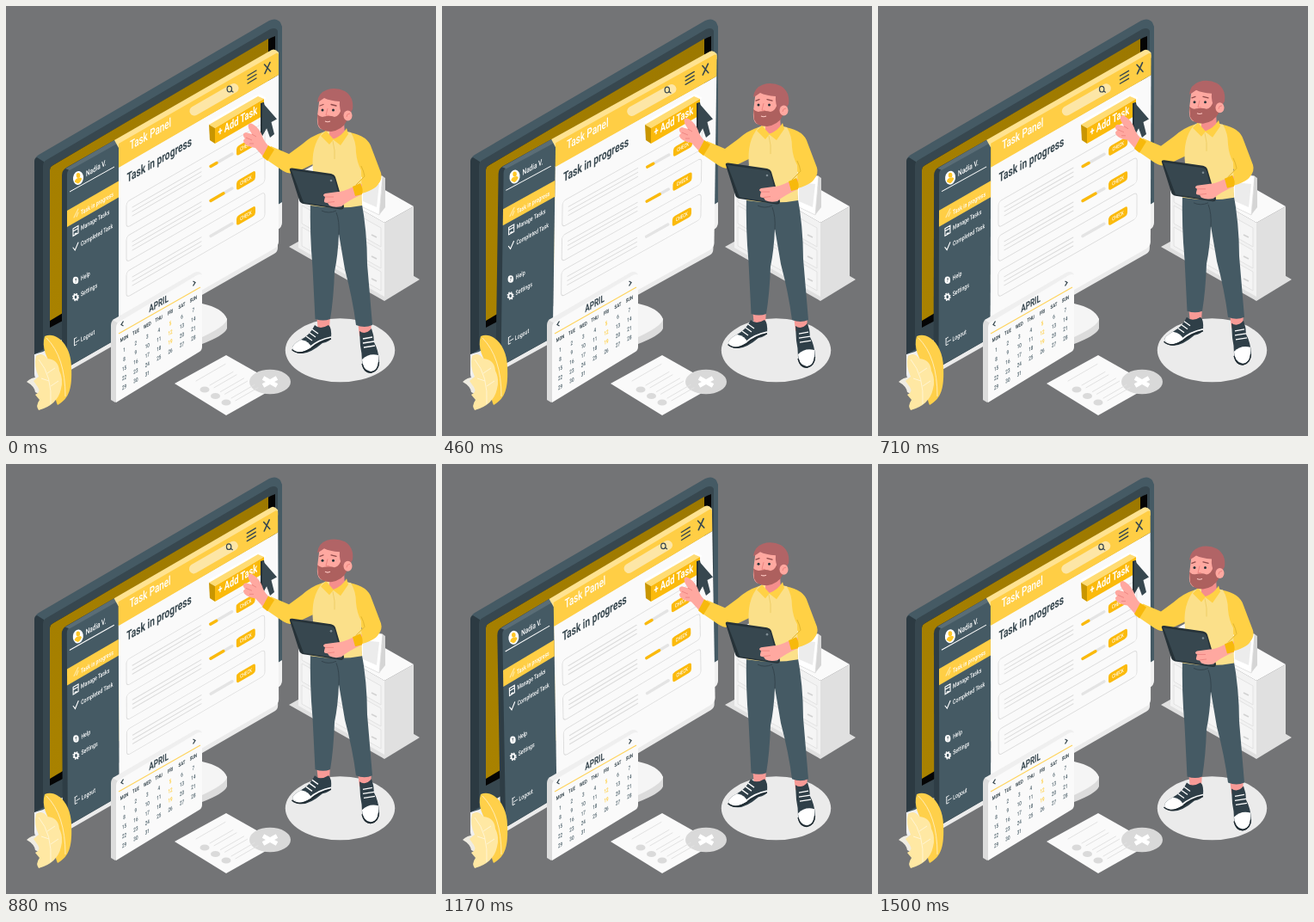
Recreate the animation shown at these times as an HTML page. Size 500x500 px, loop 1540 ms.

```html
<!DOCTYPE html>
<html lang="en">
<head>
<meta charset="utf-8">
<title>Task panel</title>
<style>
html, body { margin: 0; width: 100%; height: 100%; overflow: hidden; background: #737476; }
svg { display: block; width: 100vw; height: 100vh; }
text { font-family: Roboto, Inter, sans-serif; }
</style>
</head>
<body>
<svg viewBox="0 0 500 500" xmlns="http://www.w3.org/2000/svg">
<defs>
  <linearGradient id="gold" x1="0" y1="1" x2="1" y2="0">
    <stop offset="0" stop-color="#a98200"/><stop offset="1" stop-color="#9c7800"/>
  </linearGradient>
</defs>

<g id="monitor">
  <path d="M33 404 L321 226 V252 Q321 257 316 260 L40 436 Q33 434 33 428Z" fill="#f0f0f0"/>
  <path d="M150 385 L215 350 Q247 350 257 364 V375 Q254 383 228 393 L180 410Z" fill="#dcdcdc"/>
  <path d="M150 380 L215 349 L228 346 Q252 351 257 364 Q256 372 228 385 L180 407Z" fill="#f5f5f5"/>
  <path d="M33 405 V182 Q33 176 38 173 L306 17 Q314 13 319 19 L321 24 V228 L43 402Z" fill="#455a64"/>
  <path d="M33 405 V181 Q33 177 36 176 L44 181 V399Z" fill="#2c3a42"/>
  <path d="M43 399 V186 Q43 181 47 179 L307 27 Q314 24 316 29 V231 L80 380Z" fill="#37474f"/>
  <path d="M51 374 V191 Q51 187 55 185 L308 37 L313 35 V230 L66 366Z" fill="#050505"/>
  <path d="M51 366 V191 Q51 187 55 185 L305 38 V230 L66 357Z" fill="url(#gold)"/>
</g>

<g id="panel">
  <path d="M65 418 L316 274 V281 Q316 286 312 288 L65 429Z" fill="#ebebeb"/>
  <path d="M65 424 V197 Q65 191 70 188 L126 156 L131 159 V386Z" fill="#2e3d45"/>
  <path d="M71 420 V196 Q71 191 75 189 L131 157 V386Z" fill="#455a64"/>
  <path d="M69 189 L126 156 L131 159 L74 191Z" fill="#5a6d76"/>
  <path d="M131 187 L317 80 V274 Q317 279 312 282 L131 386Z" fill="#fafafa"/>
  <path d="M126 156 L309 51 Q313 49 317 54 V60 L131 165Z" fill="#ffe391"/>
  <path d="M131 160 L314 55 Q317 54 317 57 V80 L131 188Z" fill="#ffce45"/>
  <path d="M71 238 L131 203.5 V222.5 L71 257Z" fill="#ffce45"/>
  <path d="M74 216 L126 187" stroke="#fff" stroke-width="1"/>
  <ellipse cx="84" cy="200" rx="6" ry="8" fill="#fff" transform="rotate(8 84 200)"/>
  <ellipse cx="84" cy="197" rx="2.3" ry="2.9" fill="#ffc727"/>
  <path d="M79.8 204.5 Q80.5 200.5 84 200 Q87.5 198.5 88.2 201 Q86 206 83.5 206.5Z" fill="#ffc727"/>
  <g fill="none" stroke="#fff" stroke-width="1.1" stroke-linecap="round">
    <path d="M79 246 L84 236 M82 245 L84 240" stroke="#ffe9a6"/>
    <path d="M78 259 L84 255.5 V264 L78 267.5Z M78 262 L84 258.5 M80 265 L82 264"/>
    <path d="M78 281 L80.2 284 L84 275"/>
    <path d="M79.5 387 V395 L82 393.5 M79.500 387 L82 385.5 M81 391 L85 388.5" stroke-width=".9"/>
  </g>
  <ellipse cx="81" cy="319" rx="3.3" ry="4.3" fill="#fff"/>
  <ellipse cx="81" cy="338.5" rx="2.2" ry="2.9" fill="none" stroke="#fff" stroke-width="1.7"/>
  <ellipse cx="81" cy="338.5" rx="3.4" ry="4.2" fill="none" stroke="#fff" stroke-width="1.2" stroke-dasharray="1.5 1.5"/>
  <path d="M219 122 L265 95.5" stroke="#fde6a6" stroke-width="11" stroke-linecap="round"/>
  <g fill="none" stroke="#37474f" stroke-width="1.2" stroke-linecap="round">
    <ellipse cx="259.8" cy="96.5" rx="2.7" ry="3.3"/>
    <path d="M262 98.5 L264 100"/>
    <path d="M281 81 L291 75 M281 85.5 L291 79.5 M281 90 L291 84" stroke-width="1.4"/>
    <path d="M300.5 68 L307.5 76 M307 65.5 L301 78.5" stroke-width="1.6"/>
  </g>
</g>

<g id="button">
  <path d="M235 135 L294 102 L303 107 L243 142Z" fill="#fff"/>
  <path d="M236 138 L293 105 L300 108 L243 142Z" fill="#ffdc73"/>
  <path d="M236 138 L243 142 V160 L237 156Z" fill="#c99600"/>
  <path d="M243 142 L300 108 V127 L243 160Z" fill="#fbba0c"/>
</g>
<g id="cursor">
  <path d="M296 113 L300 112 L304 140 L298 151 L296 147Z" fill="#263238"/>
  <path d="M298 112 L315 131.5 L308.5 135 L312 149 L307 153 L303 142 L298 151Z" fill="#37474f"/>
</g>

<g id="calendar">
  <path d="M122 458 V371 Q122 366 126 364 L132 364 V458 L127 461Z" fill="#dcdcdc"/>
  <path d="M124 365 L219 310 Q225 307 228 312 L132 370Z" fill="#efefef"/>
  <path d="M128 461 V374 Q128 369 132 367 L222 313 Q228 310 228 316 V396 Q228 400 225 402Z" fill="#fafafa"/>
  <path d="M131 381 L226 327" stroke="#ffd45c" stroke-width="1.1"/>
  <g fill="none" stroke="#37474f" stroke-width="1.3">
    <path d="M136.5 366.5 L134 370.5 L136.5 372"/>
    <path d="M217.5 320 L220 321.5 L217.5 325.5"/>
  </g>
</g>

<g id="plant">
  <path d="M24 437 Q30 431 40 432 L56 440 L48 456 L34 449 Q33 442 24 437Z" fill="#efece2"/>
  <path d="M45 384 C60 378 76 396 76 420 C77 444 74 456 60 464 C54 451 60 431 56 421 C47 411 41 396 45 384Z" fill="#ffd04a"/>
  <path d="M47 386 Q69 408 69 454" fill="none" stroke="#fff0c0" stroke-width=".9"/>
  <path d="M35 407 Q42 402 48 410 Q61 411 62 424 Q67 434 64 445 Q60 464 38 470 Q34 465 39 458 L34 452 Q41 449 37 443 L32 436 L38 431 Q32 418 35 407Z" fill="#ffe8a3"/>
  <path d="M38 411 Q54 430 52 463 M48 427 L57 421 M52 442 L61 436 M50 436 L41 433" fill="none" stroke="#fff6d8" stroke-width=".9"/>
</g>

<g id="paper">
  <path d="M196 439 L256 406 L318 441 L256 476Z" fill="#fafafa"/>
  <ellipse cx="307" cy="437" rx="24" ry="14.3" fill="#d9d9d9"/>
  <path d="M299 432.5 L315 441.5 M315 432.5 L299 441.5" stroke="#fff" stroke-width="5"/>
</g>

<g id="cabinet">
  <path d="M329 280 L374 255 L481 318 L440 343Z" fill="#e0e0e0"/>
  <path d="M340 195 L374 176 L474 233 L440 252Z" fill="#fafafa"/>
  <path d="M340 195 L440 252 V338 L340 281Z" fill="#f2f2f2"/>
  <path d="M440 252 L474 233 V319 L440 338Z" fill="#e0e0e0"/>
  <path d="M344 206 L436 258 V280 L344 228Z M344 232 L436 284 V305 L344 253Z M344 257 L436 309 V331 L344 279Z" fill="#f5f5f5" stroke="#e0e0e0" stroke-width=".9"/>
  <path d="M425 266 L431 269 M425 291 L431 294 M425 317 L431 320" stroke="#d2d2d2" stroke-width="1.6"/>
  <path d="M438 198 L441 200 V234 L434 243Z" fill="#d5d5d5"/>
  <path d="M411 192 L438 198 L434 243 L411 232Z" fill="#fff" stroke="#dcdcdc" stroke-width=".8"/>
  <path d="M415 205 L434 207 L431 234 L415 227Z" fill="#ececec"/>
</g>
<ellipse cx="388.5" cy="400.3" rx="63.7" ry="37" fill="#ebebeb"/>

<g id="man">
  <path d="M361 358 H377 L376 377 L363 378Z M409 366 H425 L424 384 L411 384Z" fill="#f79a96"/>
  <path d="M333 398 Q333 393 343 388 Q354 382 359 371 Q365 377 375 371 Q379 374 378 386 Q377 390 368 392 Q354 404 344 404 Q334 404 333 398Z" fill="#2f3f48"/>
  <path d="M333 398 Q333 393 343 388 Q353 390 355 397 Q341 405 333 398Z" fill="#fff"/>
  <path d="M333 399 Q341 405 353 397 Q363 388 378 385" fill="none" stroke="#fff" stroke-width="1.7"/>
  <path d="M332.500 399.500 Q341 407 354 399 Q365 390 378 387" fill="none" stroke="#1f2a30" stroke-width="1.5"/>
  <path d="M349 384 L356 389 M353 380 L360 385 M356 376 L363 381" stroke="#fff" stroke-width="1.3"/>
  <path d="M411 378 Q418 383 425 375 Q428 383 428 391 Q433 400 434 413 Q434 425 424 427 Q414 426 414 414 Q414 404 412 395Z" fill="#2f3f48"/>
  <path d="M414 411 Q422 403 433 406 Q435 424 424 425 Q414 423 414 411Z" fill="#fff"/>
  <path d="M415 387 L426 385 M415 392 L428 390 M416 397 L429 395" stroke="#fff" stroke-width="1.3"/>
  <path d="M414 416 Q417 427 425 426 Q433 424 433.5 414" fill="none" stroke="#1f2a30" stroke-width="1.4"/>

  <path d="M354 225 L413 225 Q420 262 420 300 L426 371 Q417 375 407 371 Q403 340 394 306 L387 265 Q386 290 382 309 Q381 340 377 364 Q369 367 359.500 364 L356.500 304 Q353 265 354 225Z" fill="#455a64"/>
  <path d="M387 266 Q388 250 384 240 M367 238 Q375 242 384 238" fill="none" stroke="#34444d" stroke-width="1"/>

  <path d="M303 176 L308 166 C303 160 299 156 298 151 C296 145 291 139 285 136.5 C281 136 281 140 283 144 L286 149 L279 147 C275 148 275 151 278 154 L276 156 C276 161 283 164 290 165 L299 175Z" fill="#ffa8a0"/>
  <path d="M279 153 L286 156 M283 160 L288 160 M286 149 L291 152" fill="none" stroke="#ec8480" stroke-width=".9"/>
  <path d="M368 147 Q355 151 344 161 L329 172 L308 163 L299 176 L321 191 Q330 197 338 193 L363 181Z" fill="#ffd145"/>
  <path d="M305 162 L312 167 L304 180 L298 175Z" fill="#f7b90c"/>

  <path d="M400 147 Q421 151 425 165 L436 194 Q438 201 433 207 Q429 214 410 219 L405 210 L414 200 L400 175Z" fill="#ffd145"/>
  <path d="M368 147 L379 142 L401 147 Q407 157 407 170 Q408 182 413 191 L414 232 Q388 237 354 232 L357 192 Q354 163 368 147Z" fill="#fbe08a"/>
  <path d="M413 186 Q416 192 417 198 L407 208" fill="none" stroke="#e2b62f" stroke-width="1"/>
  <path d="M376 134 L393 134 L394 149 Q385 157 376 154Z" fill="#f58e8c"/>
  <path d="M372 145 L381 155 L376 161 L366 151Z M396 142 L398 149 L389 162 L380 155 Q391 151 396 142Z" fill="#ffd145"/>
  <path d="M380 157 Q383 168 382 178" fill="none" stroke="#ecc95f" stroke-width=".8"/>

  <path d="M364 112 Q365 101 382 101 Q396 103 396 124 L392 140 Q380 147 366 143 Q361 140 362 128Z" fill="#ffa8a0"/>
  <path d="M362 126 Q366 130 370 128.5 Q377 127 382 129 Q388 128 390 119 L396 122 L396 134 Q391 144 378 146 Q366 146 363 138Z" fill="#ad605e"/>
  <path d="M362 112 Q363 101 373 97.500 Q384 94 394 99 Q405 106 403 120 L399 127 L392 128 Q387 120 388 111 Q376 110 370 107 Q366 110 362 112Z" fill="#b16466"/>
  <ellipse cx="397.5" cy="127.500" rx="5" ry="6" fill="#ffa8a0"/>
  <path d="M396 129 Q396 125 400 125" fill="none" stroke="#ec8480" stroke-width="1"/>
  <circle cx="368" cy="121" r="1.5" fill="#263238"/>
  <circle cx="380.5" cy="121" r="1.5" fill="#263238"/>
  <path d="M365 116 L369 114.5 M378 114.5 L384 116" stroke="#8f4b4b" stroke-width="1.3" stroke-linecap="round"/>
  <path d="M374 119 L372 127 L376 127.5" fill="none" stroke="#ec8480" stroke-width="1"/>
  <path d="M371 134 Q374 135.5 377 134" fill="none" stroke="#ffc9c4" stroke-width="1.1"/>

  <path d="M330 191 Q329 188 333 188.5 L378 195 Q382 196 383 199 L393 233 Q393 237 389 236.5 L346 230 Q342 229 341 226Z" fill="#263238"/>
  <path d="M332 191 L378 197.5 Q381 198 382 201 L391 233 Q391 235 388 235 L346 228.5Z" fill="#37474f"/>
  <circle cx="378" cy="203" r="1.3" fill="#7d8b92"/>
  <path d="M414 207 L402 211 Q392 216 386 216 L371 218 Q367 220 371 222 L370 226 Q369 229 374 229 L376 232 Q382 235 390 233 Q398 226 414 219Z" fill="#ffa8a0"/>
  <path d="M371 222 L381 222 M374 228.5 L382 227.5" stroke="#ec8480" stroke-width=".9"/>
  <path d="M403 210 L412 206 Q416 213 414 219 L406 221Z" fill="#f7b90c"/>
</g>
</svg>
<script>
const NS = 'http://www.w3.org/2000/svg';
const $ = id => document.getElementById(id);
const SLOPE = 0.577, NARROW = 0.68, INK = '#37474f';

function add(parent, tag, attrs) {
  const el = document.createElementNS(NS, tag);
  for (const k in attrs) el.setAttribute(k, attrs[k]);
  return parent.appendChild(el);
}

// Text lying on the isometric wall
function label(parent, str, x, y, size, fill, weight = 500, anchor = 'start') {
  add(parent, 'text', {
    transform: `matrix(${NARROW} ${-NARROW * SLOPE} 0 1 ${x} ${y})`,
    'font-size': size, 'font-weight': weight, fill, 'text-anchor': anchor
  }).textContent = str;
}

// Stroke following the wall from x1 to x2, starting at height y
function rail(parent, x1, x2, y, color, width, cap = 'round') {
  add(parent, 'path', {
    d: `M${x1} ${y} L${x2} ${y - (x2 - x1) * SLOPE}`,
    stroke: color, 'stroke-width': width, 'stroke-linecap': cap
  });
}

// Rounded rectangle on the wall, y is its middle at x
function plate(parent, x, y, w, h, r, attrs) {
  add(parent, 'rect', {
    x: 0, y: -h / 2, width: w, height: h, rx: r,
    transform: `matrix(1 ${-SLOPE} 0 1 ${x} ${y})`, ...attrs
  });
}

function fillPanel() {
  const p = $('panel');
  label(p, 'Nadia V.', 93, 198.5, 9.4, '#fff');
  const menu = [['Task in progress', 243], ['Manage Tasks', 261], ['Completed Task', 279.5],
    ['Help', 319.5], ['Settings', 338], ['Logout', 390.5]];
  for (const [str, y] of menu) label(p, str, 87, y, 7.6, '#fff');
  label(p, '?', 81, 321.5, 6.5, INK, 700, 'middle');
  label(p, 'Task Panel', 144, 167.5, 14.5, '#fff');
  label(p, 'Task in progress', 140.5, 205.5, 15, INK, 600);

  [[243, 9], [283, 17], [324, 0]].forEach(([y, done]) => {
    plate(p, 140, y, 161, 30, 4, { fill: 'none', stroke: '#dcdcdc', 'stroke-width': 0.9 });
    for (const d of [-5, 0, 5]) rail(p, 147, 227, y - 4 + d, '#dcdcdc', 1);
    const at = x => y - (x - 140) * SLOPE;
    rail(p, 238, 263, at(238), '#e4e4e4', 3.4);
    if (done) rail(p, 238, 236 + done, at(238), '#fbba0c', 3.4);
    plate(p, 268, at(268), 22, 11, 3, { fill: '#fbba0c' });
    label(p, 'CHECK', 279, at(279) + 2, 6.2, '#fff', 500, 'middle');
  });
}

function fillCalendar() {
  const c = $('calendar');
  label(c, 'APRIL', 177.5, 350, 12, INK, 700, 'middle');
  const days = ['MON', 'TUE', 'WED', 'THU', 'FRI', 'SAT', 'SUN'];
  days.forEach((d, i) => label(c, d, 137.5 + i * 13.4, 388.5 - i * 7.6, 6.2, INK, 700, 'middle'));
  for (let n = 1; n <= 31; n++) {
    const col = (n - 1) % 7, row = Math.floor((n - 1) / 7);
    const bright = col === 4 && row < 3;
    label(c, n, 137.5 + col * 13.4, 402 + row * 10.8 - col * 7.7, 6.6,
      bright ? '#ffc727' : '#455a64', 500, 'middle');
  }
}

function fillPaper() {
  const p = $('paper');
  for (let i = 0; i < 3; i++) {
    const x = 231 + i * 12.5, y = 446 + i * 7.5;
    add(p, 'ellipse', { cx: x, cy: y, rx: 5.5, ry: 3.6, fill: '#dadada' });
    for (let k = 0; k < 2; k++) rail(p, x + 6 + k * 5, x + 33 + k * 4, y - 5 + k * 2.8, '#e2e2e2', 1);
  }
  rail(p, 221, 255, 436, '#e2e2e2', 1);
}

fillPanel();
fillCalendar();
fillPaper();
label($('button'), '+ Add Task', 246.5, 151.5, 13.6, '#fff', 600);

const LOOP = 1540, FRAMES = 37;
const start = performance.now();

// Triangle wave: 0, 1, 0, -1, 0 over one cycle
function sway(p) {
  return p < 0.25 ? p * 4 : p < 0.75 ? 2 - p * 4 : p * 4 - 4;
}

function draw(ms) {
  // steps at 24 per second
  const p = Math.floor((ms % LOOP + 4.5) * 0.024) % FRAMES / FRAMES;
  const lift = -10 * (1 - Math.abs(1 - 2 * p));
  $('panel').setAttribute('transform', `rotate(${sway(p)} 191 238)`);
  $('man').setAttribute('transform', `translate(0 ${lift})`);
}

function tick() {
  draw(performance.now() - start);
  requestAnimationFrame(tick);
}
draw(0);
requestAnimationFrame(tick);
</script>
</body>
</html>
```
